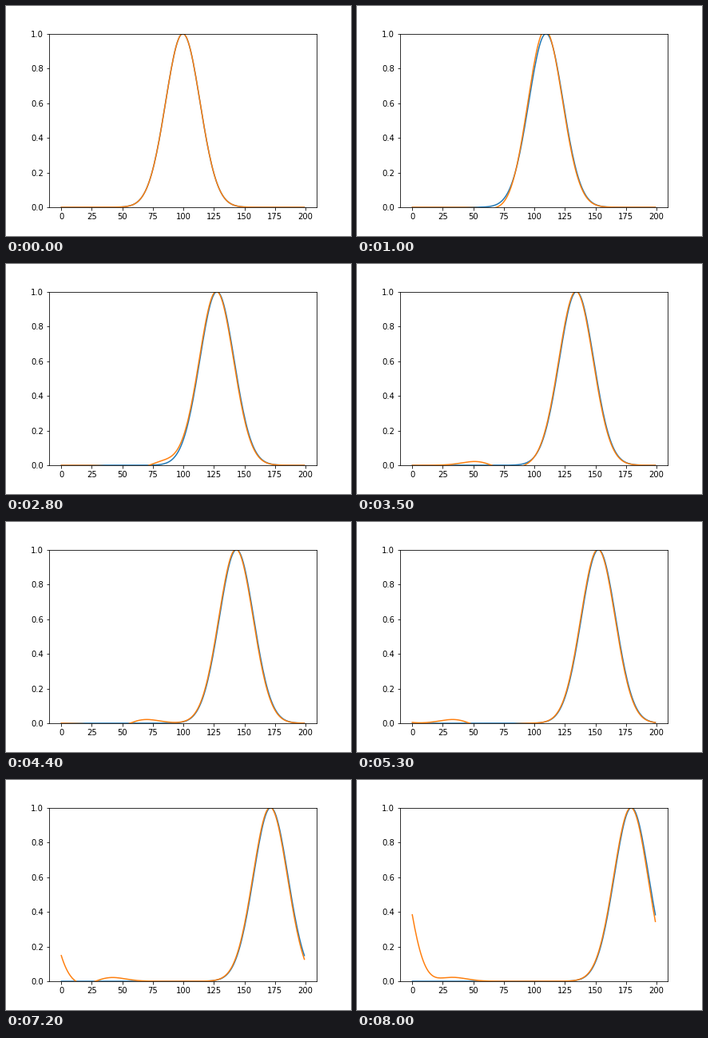
These frames come from a looping animation (432x288 px, 8100 ms). A matplotlib script:

```python
import numpy as np
import matplotlib.pyplot as plt
from matplotlib.animation import FuncAnimation

N = 200          # grid points, the first and last are ghost cells
STEPS = 81
COURANT = 1.0

cells = np.arange(N)
grid = np.linspace(0, 1, N)
dx = grid[1] - grid[0]


def pulse(center):
    return np.exp(-((grid - center) / 0.1) ** 2)


def leapfrog(previous, current):
    """One centred step of the advection equation on a periodic domain."""
    new = np.empty(N)
    new[1:-1] = previous[1:-1] - COURANT * (current[2:] - current[:-2])
    new[0], new[-1] = new[-2], new[1]
    return new


exact = [pulse(0.5 + n * COURANT * dx) for n in range(STEPS)]

# Starting from two equal levels excites the backward-moving numerical mode.
numeric = [pulse(0.5), pulse(0.5)]
while len(numeric) < STEPS:
    numeric.append(leapfrog(numeric[-2], numeric[-1]))

plt.rcParams["font.family"] = "DejaVu Sans"
fig, ax = plt.subplots(figsize=(6, 4), dpi=72)
fig.subplots_adjust(left=0.125, right=0.9, bottom=0.125, top=0.88)
exact_line, = ax.plot(cells, exact[0])
numeric_line, = ax.plot(cells, numeric[0])
ax.set_ylim(0, 1)


def update(n):
    exact_line.set_ydata(exact[n])
    numeric_line.set_ydata(numeric[n])
    return exact_line, numeric_line


anim = FuncAnimation(fig, update, frames=STEPS, interval=100, repeat=True,
                     repeat_delay=0)
plt.show()
```
